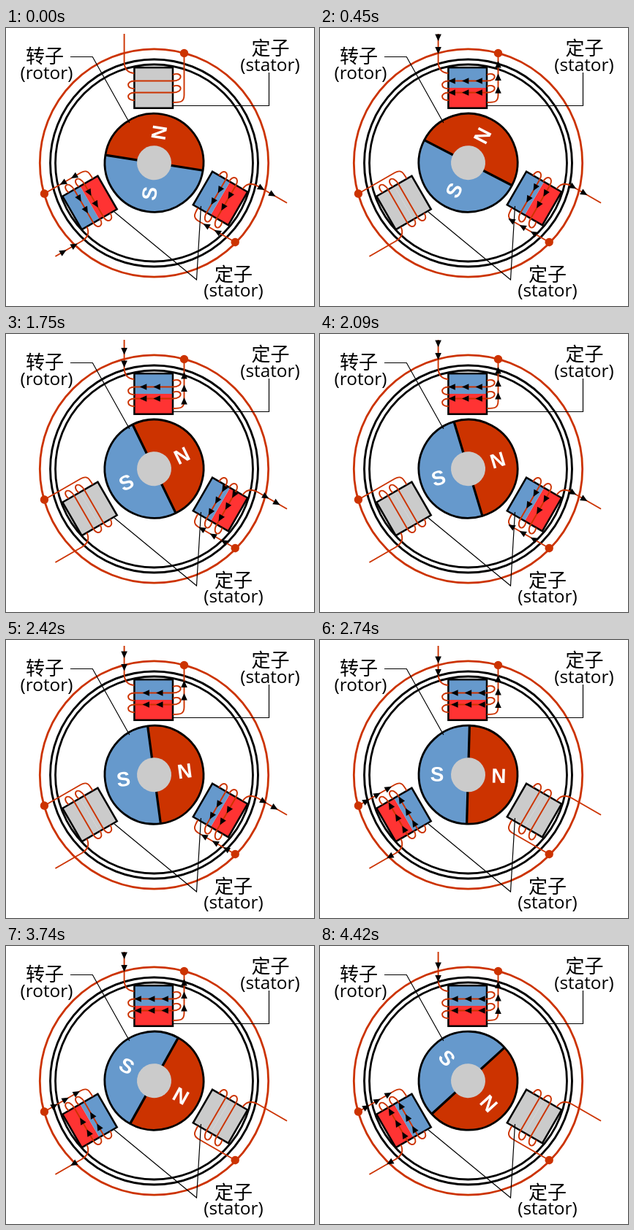
Recreate the animation shown at these times as an HTML page with a canvas. Size 421 px wide and 381 px high, loop 4470 ms.

```html
<!DOCTYPE html>
<html lang="zh">
<head>
<meta charset="utf-8">
<title>Motor</title>
<style>
  html, body { margin: 0; width: 100%; height: 100%; overflow: hidden; background: #fff; }
  canvas { display: block; }
</style>
</head>
<body>
<canvas id="stage" width="421" height="381"></canvas>
<script>
const ctx = document.getElementById('stage').getContext('2d');
const LOOP = 4470;
const STEP_TIMES = [0, 130, 450, 780, 1120, 1400, 1750, 2090, 2420, 2740, 3090, 3420, 3740, 4090, 4420];
const COPPER = '#cc3300', BLUE = '#6699cc', RED = '#ff3333', GRAY = '#cbcbcb';
const TAU = Math.PI * 2, DEG = Math.PI / 180;
const CX = 202.5, CY = 184.7;

// Phases are arrow offsets at step 0 for [forward, reverse] current.
const STATORS = [
  { x: 201.7, y: 82, turn: 0, leadEnd: -74, lead: [-65.5, -59], feed: [-18, -2],
    leadMin: [-69, -68], current: step => step < 2 ? 0 : 1 },
  { x: 114.5, y: 239.5, turn: -120, leadEnd: -77.5, lead: [-65, -52], feed: [-18, -10.6],
    leadMin: [-69, -54], current: step => step < 2 ? 1 : step < 9 ? 0 : -1 },
  { x: 293, y: 233.5, turn: 120, leadEnd: -82, lead: [-65, -59], feed: [-18, -2],
    leadMin: [-69, -68], current: step => step < 9 ? -1 : 0 }
];

const COIL = new Path2D(`
  M26.5 -18 C39 -23 42 -9.5 26 -9.5 L-26 -9.5 C-38 -9.5 -37 2 -26 1
  M26.5 -2 C39 -7 42 6.5 26 6.5 L-26 6.5 C-38 6.5 -37 18 -26 17
  M26.5 20 C36 20 41.8 20 41.8 10 L41.8 -47.5`);

function circle(x, y, r, fill, stroke, width) {
  ctx.beginPath();
  ctx.arc(x, y, r, 0, TAU);
  if (fill) { ctx.fillStyle = fill; ctx.fill(); }
  if (stroke) { ctx.strokeStyle = stroke; ctx.lineWidth = width; ctx.stroke(); }
}

function polyline(points, width) {
  ctx.beginPath();
  points.forEach(([x, y]) => ctx.lineTo(x, y));
  ctx.strokeStyle = '#000';
  ctx.lineWidth = width;
  ctx.stroke();
}

function placed(x, y, angle, draw) {
  ctx.save();
  ctx.translate(x, y);
  ctx.rotate(angle);
  draw();
  ctx.restore();
}

function label(text, x, y, font, color = '#000') {
  ctx.font = font;
  ctx.fillStyle = color;
  ctx.textAlign = 'center';
  ctx.fillText(text, x, y);
}

function arrow(x, y, angle) {
  placed(x, y, angle, () => {
    ctx.beginPath();
    ctx.moveTo(5, 0);
    ctx.lineTo(-4.4, -4.3);
    ctx.lineTo(-4.4, 4.3);
    ctx.fillStyle = '#000';
    ctx.fill();
  });
}

// Evenly spaced arrows advance two fifths of their gap on every step.
function stream(phase, dir, gap, step, min, max, draw) {
  const offset = phase + dir * gap * 0.4 * step;
  const first = offset + Math.ceil((min - offset) / gap - 1e-6) * gap;
  for (let p = first; p <= max; p += gap) draw(p);
}

function drawArrows(stator, dir, step) {
  const mode = dir > 0 ? 0 : 1;
  const along = dir * Math.PI / 2;
  stream(stator.lead[mode], dir, 17.5, step, stator.leadMin[mode], -36,
    y => arrow(-40.1, y, along));
  stream(stator.feed[mode], -dir, 17.5, step, -35.2, 12,
    y => arrow(41.8, y, -along));
  for (const row of [-9.5, 6.5]) {
    stream(mode ? -9.6 : 12.1, -dir, 18.5, step, -22, 22,
      x => arrow(x, row, dir > 0 ? Math.PI : 0));
  }
}

function drawStator(stator, step) {
  const dir = stator.current(step);
  placed(stator.x, stator.y, stator.turn * DEG, () => {
    ctx.fillStyle = dir ? (dir > 0 ? BLUE : RED) : GRAY;
    ctx.fillRect(-26.3, -27.8, 52.6, 27.8);
    ctx.fillStyle = dir ? (dir > 0 ? RED : BLUE) : GRAY;
    ctx.fillRect(-26.3, 0, 52.6, 27.8);
    ctx.strokeStyle = '#000';
    ctx.lineWidth = 2.5;
    ctx.strokeRect(-26.3, -27.8, 52.6, 55.6);

    ctx.strokeStyle = COPPER;
    ctx.lineWidth = 1.9;
    ctx.beginPath();
    ctx.moveTo(-40.1, stator.leadEnd);
    ctx.lineTo(-40.1, -36);
    ctx.quadraticCurveTo(-40.1, -21, -26.5, -20);
    ctx.stroke();
    ctx.stroke(COIL);
    circle(41.8, -47.5, 5.7, COPPER);
    if (dir) drawArrows(stator, dir, step);
  });
}

function drawRotor(step) {
  const angle = (9 + 9.18 * step - 90) * DEG;
  placed(CX, CY, angle, () => {
    circle(0, 0, 67.5, BLUE);
    ctx.beginPath();
    ctx.arc(0, 0, 67.5, -Math.PI / 2, Math.PI / 2);
    ctx.fillStyle = COPPER;
    ctx.fill();
    circle(0, 0, 67.5, null, '#000', 2.8);
    polyline([[0, -67.5], [0, 67.5]], 3.2);
    circle(0, 0, 23.5, GRAY);
    const font = 'bold 28px "Liberation Sans", Arial, sans-serif';
    label('N', 42, 10, font, '#fff');
    label('S', -42.5, 10, font, '#fff');
  });
}

function drawLabels() {
  polyline([[88, 39.5], [118.3, 39.5], [168.8, 130]], 1.2);
  polyline([[359.5, 61], [359.5, 106.5], [228, 106.5]], 1.2);
  polyline([[148, 252], [260.5, 345], [266.5, 244]], 1.2);
  const han = '26px "Noto Sans CJK SC", "Noto Sans CJK", sans-serif';
  const latin = '24.4px "Open Sans", "Noto Sans", sans-serif';
  label('转子', 53, 47.5, han);
  label('(rotor)', 55.5, 69.5, latin);
  label('定子', 361.5, 36.5, han);
  label('(stator)', 361, 58.5, latin);
  label('定子', 311, 346.5, han);
  label('(stator)', 311, 367.5, latin);
}

function render(time) {
  const t = time % LOOP;
  let step = STEP_TIMES.length - 1;
  while (STEP_TIMES[step] > t) step--;

  ctx.fillStyle = '#fff';
  ctx.fillRect(0, 0, 421, 381);
  circle(CX, 185, 156.2, null, COPPER, 2.8);
  circle(CX, 185, 142, null, '#000', 2.9);
  circle(CX, 185, 135, null, '#000', 2.8);
  STATORS.forEach(stator => drawStator(stator, step));
  drawRotor(step);
  drawLabels();
}

const start = performance.now();
function tick() {
  render(performance.now() - start);
  requestAnimationFrame(tick);
}
tick();
</script>
</body>
</html>
```
